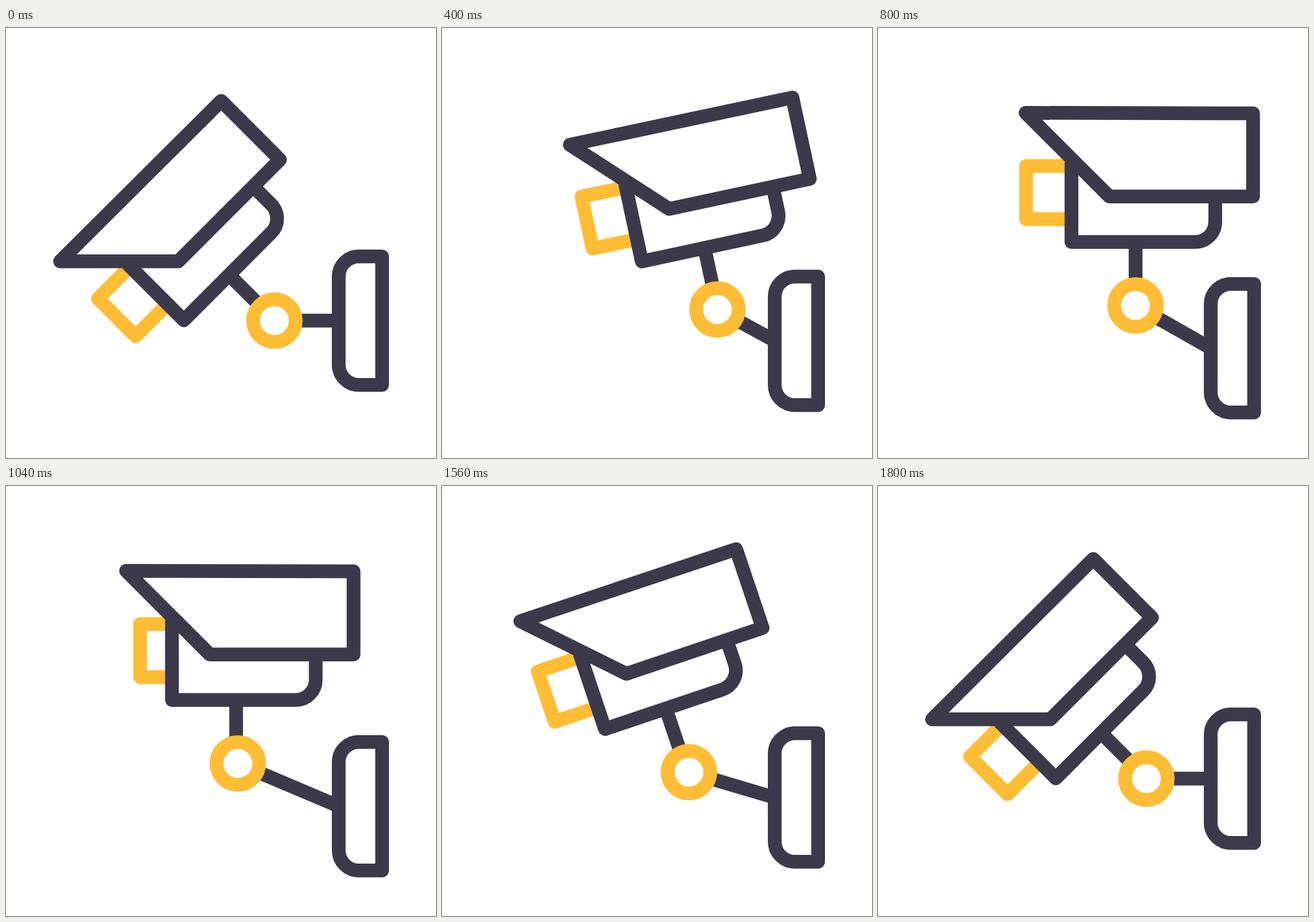
An HTML page for the animation above (2000 ms loop, 640x640 px).

```html
<!DOCTYPE html>
<html lang="en">
<head>
<meta charset="utf-8">
<title>Security camera</title>
<style>
  html, body { margin: 0; width: 100%; height: 100%; overflow: hidden; background: #fff; }
  svg { display: block; width: 100%; height: 100%; }
  svg * { stroke-width: 20.5; stroke-linejoin: round; }
  .dark { stroke: #3c394b; fill: #fff; }
  .gold { stroke: #ffbc35; fill: #fff; }
</style>
</head>
<body>
<svg viewBox="0 0 640 640">
  <line id="arm" class="dark" x2="495.2"/>
  <path id="wall" class="dark" d="M559.8 340V531.2H525.2a30 30 0 0 1-30-30V370a30 30 0 0 1 30-30Z"/>
  <g id="camera">
    <path class="dark" d="M342.5 318.5v75"/>
    <path id="lens" class="gold" d="M255 205.5H179.5V284.5H255"/>
    <path class="dark" d="M247 200V318.5H431a30 30 0 0 0 30-30V250"/>
    <path class="dark" d="M178.7 126.3L517.3 127V250.7H303.3Z"/>
  </g>
  <circle id="ring" class="gold" r="31.75"/>
</svg>
<script>
const LOOP = 2000, STEP = 40;
const [arm, wall, camera, lens, ring] =
  ['arm', 'wall', 'camera', 'lens', 'ring'].map(id => document.getElementById(id));

const linear = (t, from, to) => Math.min(1, Math.max(0, (t - from) / (to - from)));
const smooth = (t, from, to) => (1 - Math.cos(Math.PI * linear(t, from, to))) / 2;
const easeOut = (k, power) => 1 - (1 - k) ** power;

const set = (el, attrs) => {
  for (const name in attrs) el.setAttribute(name, attrs[name]);
};

function draw(t) {
  const raise = linear(t, 120, 503);
  const slide = linear(t, 640, 1023);
  const lower = smooth(t, 1400, 1760);
  const zoom = smooth(t, 900, 1200) - smooth(t, 1200, 1410);

  // The camera turns about its joint while the joint itself travels.
  const angle = -45 * (1 - raise + lower);
  const back = lower ** 1.13;
  const x = 399.3 + 13.5 * easeOut(raise, 1.4) - 70.3 * slide + 56.8 * back;
  const y = 434.6 + 21.1 * (back - raise ** 1.24);
  set(camera, { transform: `translate(${x} ${y}) rotate(${angle}) translate(-342.5 -413.5)` });
  set(lens, { transform: `translate(${45 * zoom} 0)` });

  const cx = 399.5 + 11.3 * easeOut(raise, 2) - 65.8 * slide + 54.5 * lower;
  const cy = 435.5 + 22.5 * (easeOut(lower, 1.6) - raise);
  set(ring, { cx, cy });

  const drop = 41 * (raise - lower ** 1.31);
  set(wall, { transform: `translate(0 ${drop})` });
  set(arm, { x1: cx, y1: cy, y2: 435.6 + drop });
}

const start = performance.now();
function tick() {
  const t = (performance.now() - start) % LOOP;
  draw(Math.floor(t / STEP) * STEP);
  requestAnimationFrame(tick);
}
tick();
</script>
</body>
</html>
```
